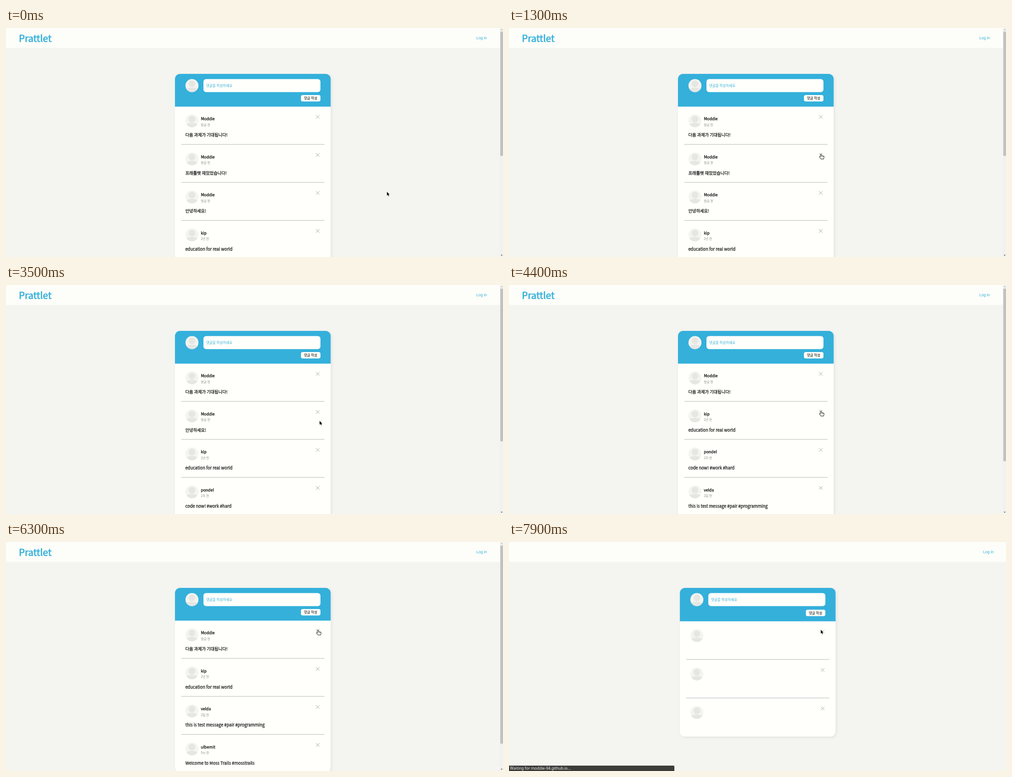
Write an HTML page with a canvas that moves like this. It is 1100 px wide and 509 px high and loops after 8 s.

```html
<!DOCTYPE html>
<html lang="ko">
<head>
<meta charset="utf-8">
<style>
  html, body { margin: 0; width: 100%; height: 100%; overflow: hidden; background: #f4f4f0; }
  canvas { display: block; }
</style>
</head>
<body>
<canvas id="stage" width="1100" height="509"></canvas>
<script>
const ctx = document.getElementById('stage').getContext('2d');
const LOOP = 8000, STATUS_AT = 7500, RELOAD_AT = 7900;
const BLUE = '#34b0db', PAPER = '#fffffb', HEADER = '#fdfdf9', PAGE = '#f4f4f0';
const LIST_TOP = 174.5, ROW = 84.5, CLOSE_X = 690, CLOSE_Y = 23;
const KOREAN = '"Noto Sans CJK KR", "Noto Sans CJK", sans-serif';

const posts = [
  { name: 'Moddie', ago: '방금 전', text: '다음 과제가 기대됩니다!' },
  { name: 'Moddie', ago: '방금 전', text: '프래틀렛 재밌었습니다!' },
  { name: 'Moddie', ago: '방금 전', text: '안녕하세요!' },
  { name: 'kip', ago: '2년 전', text: 'education for real world' },
  { name: 'larek', ago: '2달 전', text: 'Stay hungry, and stay foolish' },
  { name: 'pondel', ago: '2주 전', text: 'code now! #work #hard' },
  { name: 'velda', ago: '2일 전', text: 'this is test message #pair #programming' },
  { name: 'ulbemit', ago: '9시 전', text: 'Welcome to Moss Trails #mosstrails' },
];

// A move with a click ends on the close icon of its row and deletes that post.
const moves = [
  { start: 0, end: 400, x: 728, y: 356, bowY: 46 },
  { start: 500, end: 1300, row: 1, click: 1600 },
  { start: 1800, end: 2500, row: 3, click: 2700, bowX: 50 },
  { start: 2800, end: 3500, x: 694, y: 302 },
  { start: 3600, end: 4000, row: 1, click: 4200 },
  { start: 4500, end: 5000, row: 2, click: 5200 },
  { start: 5500, end: 6300, row: 0, click: 6500 },
  { start: 7300, end: 7400, x: 690, y: 195 },
];

const arrow = new Path2D('M0 0V8.6L2 6.8L3.4 10L4.9 9.3L3.5 6.3H6.2Z');
const hand = new Path2D('M-1.1 6.4V1Q0 -.5 1.1 1V4L3 4.2L5 4.7Q6.8 5 6.6 7L5.6 11H.2L-3 7.4Q-3 5.4 -1.1 6.9Z');
const knuckles = new Path2D('M1.1 4V6M3 4.3V6M4.9 4.8V6.3');

function rect(x, y, w, h, color, radius = 0) {
  ctx.fillStyle = color;
  ctx.beginPath();
  ctx.roundRect(x, y, w, h, radius);
  ctx.fill();
}

function text(str, x, y, size, color, family = KOREAN) {
  ctx.font = `${size}px ${family}`;
  ctx.fillStyle = color;
  ctx.fillText(str, x, y);
}

// A thin outline thickens the regular weight to a medium one.
function mediumText(str, x, y, size, color) {
  text(str, x, y, size, color);
  ctx.strokeStyle = color;
  ctx.lineWidth = size * 0.035;
  ctx.strokeText(str, x, y);
}

function ellipse(x, y, rx, ry, color) {
  ctx.fillStyle = color;
  ctx.beginPath();
  ctx.ellipse(x, y, rx, ry, 0, 0, 7);
  ctx.fill();
}

function avatar(x, y) {
  ctx.save();
  ellipse(x, y, 14.4, 14.4, '#f4f4f1');
  ctx.clip();
  ellipse(x, y - 4, 7.4, 7.4, '#e6e6e3');
  ellipse(x, y + 11.5, 13.5, 7, '#e6e6e3');
  ctx.restore();
}

function closeIcon(x, y) {
  ctx.strokeStyle = '#8f8f8c';
  ctx.lineWidth = 0.8;
  ctx.beginPath();
  ctx.moveTo(x - 4, y - 4); ctx.lineTo(x + 4, y + 4);
  ctx.moveTo(x + 4, y - 4); ctx.lineTo(x - 4, y + 4);
  ctx.stroke();
}

function triangle(x, y, dir, color) {
  ctx.fillStyle = color;
  ctx.beginPath();
  ctx.moveTo(x - 2, y); ctx.lineTo(x + 2, y); ctx.lineTo(x, y + 2.2 * dir);
  ctx.fill();
}

function scrollbar(pageHeight) {
  rect(1093, 0, 7, 509, '#f1f1f1');
  rect(1094, 8, 6, 493 * 509 / pageHeight, '#c1c1c1');
  triangle(1097, 4.5, -1, '#a3a3a3');
  triangle(1097, 504, 1, '#505050');
}

function card(list, loaded) {
  const top = loaded ? LIST_TOP : LIST_TOP + 1.5;
  const rowHeight = loaded ? ROW : ROW + 1;

  ctx.save();
  ctx.shadowColor = 'rgba(0,0,0,.08)';
  ctx.shadowBlur = 6;
  ctx.shadowOffsetX = ctx.shadowOffsetY = 2;
  rect(374, 102, 344.6, top + list.length * rowHeight - 102, PAPER, 11.5);
  ctx.restore();

  rect(374, 102, 344.6, top - 101.8, BLUE, [11.5, 11.5, 0, 0]);
  avatar(411.6, 128);
  rect(437, 113.6, 259, 28.8, PAPER, 6);
  text('댓글을 작성하세요', 443, 130.9, 7.64, BLUE);
  rect(652.8, top - 25.5, 43.2, 14.2, PAPER, 4);
  text('댓글 작성', 659.2, top - 15.4, 7.64, '#000');

  list.forEach((post, i) => {
    const y = top + i * rowHeight;
    avatar(411.6, y + 31.8);
    closeIcon(CLOSE_X, y + CLOSE_Y);
    if (loaded) {
      mediumText(post.name, 431.2, y + 30.5, 8.8, '#111');
      text(post.ago, 431.2, y + 43.1, 6.88, '#858583');
      mediumText(post.text, 396.9, y + 66.7, 9.4, '#222');
    }
    if (i < list.length - 1) rect(388, y + rowHeight - 0.9, 317, 1.1, '#c3c4bf');
  });
}

function destination({ x, y, row, click }) {
  return click ? [CLOSE_X + 0.5, LIST_TOP + row * ROW + CLOSE_Y - 2] : [x, y];
}

function pointer(t) {
  const index = moves.findLastIndex(move => t >= move.start);
  const { start, end, click, bowX = 0, bowY = 0 } = moves[index];
  const [x0, y0] = index ? destination(moves[index - 1]) : [843, 364];
  const [x1, y1] = destination(moves[index]);
  const eased = 1 - (1 - Math.min(1, (t - start) / (end - start))) ** 2;
  const bow = 4 * eased * (1 - eased);
  const isHand = click && eased > 0.85;
  const shape = isHand ? hand : arrow;

  ctx.save();
  ctx.translate(x0 + (x1 - x0) * eased + bowX * bow, y0 + (y1 - y0) * eased + bowY * bow);
  ctx.lineJoin = 'round';
  ctx.lineWidth = 1.3;
  ctx.strokeStyle = isHand ? '#222' : '#fff';
  ctx.fillStyle = isHand ? '#fff' : '#111';
  ctx.stroke(shape);
  ctx.fill(shape);
  if (isHand) {
    ctx.lineWidth = 0.6;
    ctx.stroke(shape);
    ctx.stroke(knuckles);
  }
  ctx.restore();
}

function draw(t) {
  const list = [...posts];
  for (const { row, click } of moves) if (t >= click) list.splice(row, 1);
  const loaded = t < RELOAD_AT;
  const pageHeight = 232 + ROW * list.length;
  const scrolls = pageHeight > 509;

  rect(0, 0, 1100, 509, PAGE);
  rect(0, 0, 1100, 44.5, HEADER);
  if (loaded) mediumText('Prattlet', 28.4, 31, 20.8, BLUE);
  text('Log in', scrolls ? 1040.9 : 1049.4, 25.2, 8.6, BLUE, '"Liberation Sans", sans-serif');

  ctx.save();
  if (!scrolls) ctx.translate(4.2, 0);
  card(list, loaded);
  ctx.restore();

  if (scrolls) scrollbar(pageHeight);
  if (t >= STATUS_AT) {
    rect(0, 497, 366, 12, '#3c3c3b', [0, 2, 0, 0]);
    text('Waiting for moddie-94.github.io…', 2.2, 506.2, 8.5, '#f2f2f0', '"Noto Sans", sans-serif');
  }
  pointer(t);
}

// The screen updates in steps of 100 ms.
function tick() {
  draw(Math.floor(performance.now() % LOOP / 100) * 100);
  requestAnimationFrame(tick);
}
tick();
</script>
</body>
</html>
```
